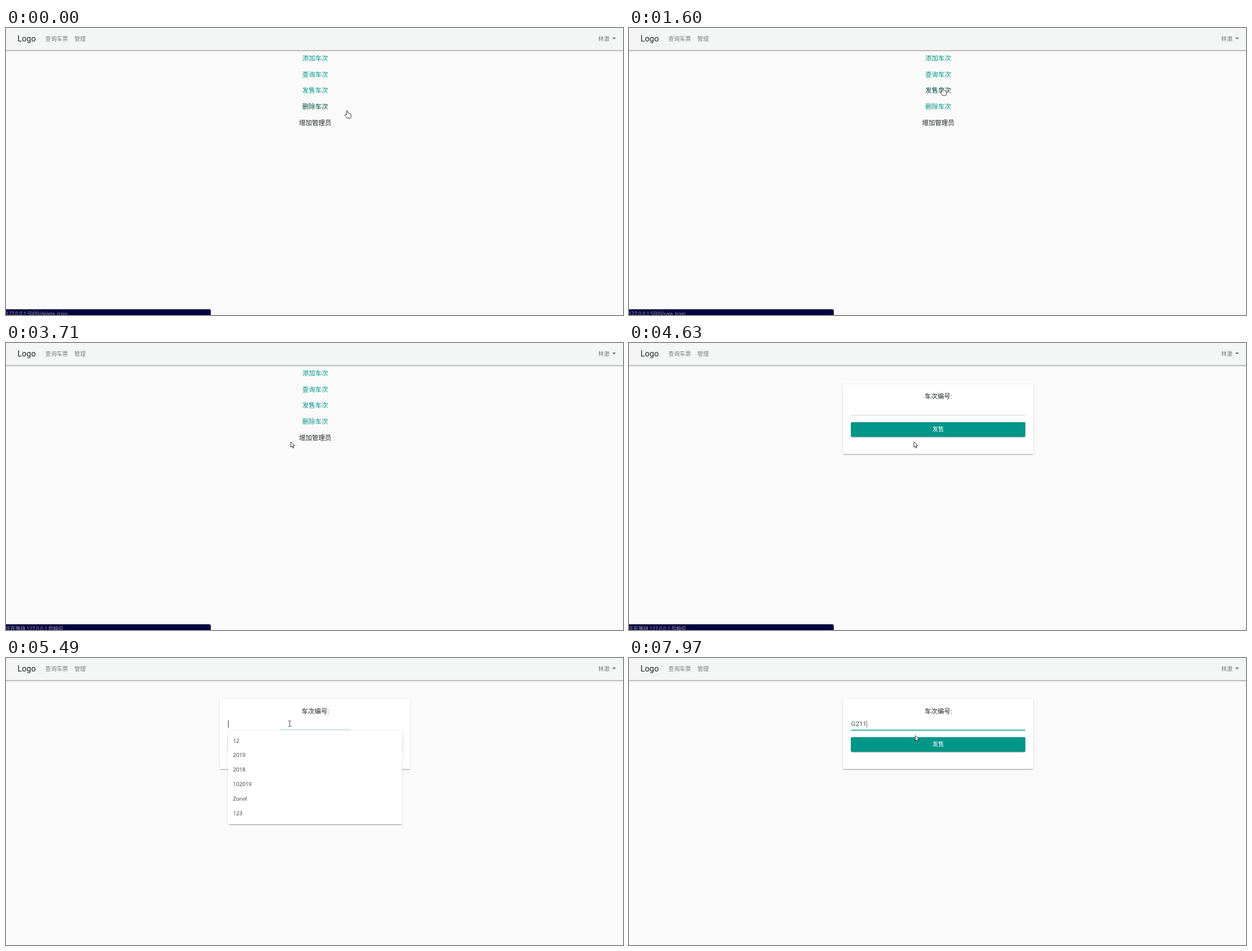
An HTML page with a canvas that plays this animation: 1096x511 px, repeating every 7.99 s.

```html
<!DOCTYPE html>
<html lang="zh">
<head>
<meta charset="utf-8">
<title>车次管理</title>
<style>
html, body { margin: 0; width: 100%; height: 100%; overflow: hidden; background: #fafafa; }
canvas { display: block; }
</style>
</head>
<body>
<canvas id="stage" width="1096" height="511"></canvas>
<script>
const ctx = document.getElementById('stage').getContext('2d');
const LOOP = 7990;
const TEAL = '#009688', INK = '#212529';
const SANS = 'Roboto, "Noto Sans CJK SC", "Noto Sans CJK", sans-serif';
const UI = '"Open Sans", "Noto Sans CJK SC", "Noto Sans CJK", sans-serif';

const LINKS = ['添加车次', '查询车次', '发售车次', '删除车次'];
const HISTORY = ['12', '2019', '2018', '102019', 'Zorvil', '123'];

const shapes = {
  hand: new Path2D('M-1.2 8V1.2Q-1.2 0 0 0T1.2 1.2V4.6Q3.3 4 3.5 5.2Q5.4 4.8 5.6 6Q7 5.8 7 7.4V10Q6.8 11.5 6 13.4H-.6Q-1.5 11.5-4 8.6Q-4.2 7-2.8 7.2Z'),
  arrow: new Path2D('M0 0V9.6L2.2 7.6L3.7 11L5.3 10.3L3.8 7H7Z'),
  beam: new Path2D('M-2.5-5H-.6L0-4.4L.6-5H2.5M0-4.4V4.4M-2.5 5H-.6L0 4.4L.6 5H2.5')
};

// Pointer keys: time, x, y, shape from that time on
const MOVES = [
  [180, 606, 147, 'hand'], [300, 611, 140, 'hand'], [700, 560, 102, 'hand'],
  [980, 560, 102, 'hand'], [1130, 560, 71, 'hand'], [1290, 560, 71, 'hand'],
  [1600, 557, 106.5, 'hand'], [2960, 557, 106.5, 'hand'], [3040, 536, 146, 'arrow'],
  [3120, 516, 186, 'arrow'], [3510, 516, 186, 'arrow'], [3710, 506, 176, 'arrow'],
  [4900, 506, 176, 'arrow'], [4960, 496, 135.5, 'arrow'], [5040, 500, 122, 'beam'],
  [5180, 504, 117, 'beam'], [6180, 504, 117, 'beam'], [6210, 504, 125, 'beam'],
  [7920, 504, 125, 'beam'], [7970, 508.5, 138, 'arrow']
];

// Value of the last [time, value] pair that has begun
const at = (steps, t) => steps.reduce((v, s) => t >= s[0] ? s[1] : v, null);
const between = (t, a, b) => t >= a && t < b;
const clamp = v => Math.max(0, Math.min(1, v));

const HOVER = [[0, 3], [400, 2], [1040, 1], [1440, 2], [3000, -1]];
const STATUS = [
  [0, '127.0.0.1:5000/delete_train'], [400, '127.0.0.1:5000/sale_train'],
  [1040, '127.0.0.1:5000/query_train'], [1440, '127.0.0.1:5000/sale_train'],
  [3080, '正在等待 127.0.0.1 的响应...']
];
const TYPED = [[0, ''], [6180, 'G'], [7180, 'G2'], [7480, 'G21'], [7610, 'G211']];

function text(str, x, y, size, color, font = SANS) {
  ctx.font = size + 'px ' + font;
  ctx.fillStyle = color;
  ctx.fillText(str, x, y);
}

function rect(x, y, w, h, color, radius = 0) {
  ctx.fillStyle = color;
  ctx.beginPath();
  ctx.roundRect(x, y, w, h, radius);
  ctx.fill();
}

// Material elevation: three stacked shadows below one panel
function panel(x, y, w, h, color, radius) {
  const layers = [[1.45, 1.45, 0, 0.14], [2.2, 0.7, 1.4, 0.26], [0.7, 3.6, 0, 0.14]];
  for (const [dy, blur, inset, alpha] of layers) {
    ctx.save();
    ctx.shadowColor = `rgba(0,0,0,${alpha})`;
    ctx.shadowBlur = blur;
    ctx.shadowOffsetY = dy;
    rect(x + inset, y + inset, w - 2 * inset, h - 2 * inset, color, radius);
    ctx.restore();
  }
  rect(x, y, w, h, color, radius);
}

function drawNav() {
  panel(-5, -5, 1106, 44.4, '#f4f6f5', 0);
  rect(0, 39.4, 1096, 1, 'rgba(0,0,0,.2)');
  text('Logo', 20.6, 23.7, 14.4, INK);
  text('查询车票', 69.8, 22.7, 10.1, '#7b7c7c');
  text('管理', 121.5, 22.7, 10.1, '#7b7c7c');
  text('林澈', 1051.8, 22.7, 10.1, '#7b7c7c');
  ctx.fillStyle = '#6c6d6d';
  ctx.fill(new Path2D('M1077 17H1083.4L1080.2 20.2Z'));
}

function drawMenu(t) {
  const active = at(HOVER, t);
  LINKS.forEach((label, i) =>
    text(label, 526.2, 58 + 28.7 * i, 11.5, i === active ? '#004a43' : TEAL));
  text('增加管理员', 520.4, 172.8, 11.5, INK);
}

// Progress of the CSS ease-out curve
function easeOut(p) {
  let lo = 0, hi = 1;
  for (let i = 0; i < 20; i++) {
    const s = (lo + hi) / 2;
    if (1.74 * s * s * (1 - s) + s ** 3 < p) lo = s; else hi = s;
  }
  return 3 * lo * lo - 2 * lo ** 3;
}

function drawForm(t) {
  panel(380, 73.4, 338, 124.2, '#fff', 1.5);
  text('车次编号:', 525, 99.2, 11.5, INK);
  rect(394.5, 128, 309.3, 1, '#d2d2d2');
  panel(394.5, 141, 309.3, 25.8, TEAL, 1.5);
  text('发售', 539, 157.2, 10.3, '#fff');

  const grow = 309.3 * easeOut(clamp((t - 5410) / 300));
  if (grow) rect(549.2 - grow / 2, 127.8, grow, 1.5, TEAL);

  const typed = at(TYPED, t);
  text(typed, 394.6, 121.2, 11.5, '#495057');
  if (between(t, 5380, 5920) || t >= 6180) {
    const x = 394.5 + ctx.measureText(typed).width;
    rect(typed ? x + 0.2 : x, 111, 1, 13, typed ? '#777' : '#222');
  }

  if (between(t, 5450, 7290)) {
    const rows = t < 6210 ? HISTORY : ['G1'];
    panel(394.5, 128.5, 309.5, 12 + 25.9 * rows.length, '#fff', 2.5);
    rows.forEach((row, i) => text(row, 403.2, 150.5 + 25.9 * i, 9.6, '#333', UI));
  }
}

function drawStatus(t) {
  const alpha = t < 4900 ? 1 : clamp((5010 - t) / 130);
  if (!alpha) return;
  ctx.globalAlpha = alpha;
  rect(-4, 500.8, 367.8, 16, '#04043f', 3);
  text(at(STATUS, t), -0.4, 511.6, 8.7, '#a3a3b0', UI);
  ctx.globalAlpha = 1;
}

function pointer(t) {
  const next = MOVES.findIndex(m => m[0] > t);
  if (next === 0) return MOVES[0].slice(1);
  if (next < 0) return MOVES[MOVES.length - 1].slice(1);
  const [t0, x0, y0, kind] = MOVES[next - 1];
  const [t1, x1, y1] = MOVES[next];
  const p = (t - t0) / (t1 - t0);
  return [x0 + (x1 - x0) * p, y0 + (y1 - y0) * p, kind];
}

function drawPointer(t) {
  const [x, y, kind] = pointer(t);
  if (between(t, 2600, 2650) || between(t, 5380, 5430)) {
    ctx.fillStyle = 'rgba(255,255,0,.45)';
    ctx.beginPath();
    ctx.arc(x, y, 8, 0, 7);
    ctx.fill();
  }
  ctx.save();
  ctx.translate(x, y);
  ctx.lineWidth = 0.9;
  ctx.lineJoin = 'round';
  ctx.strokeStyle = '#222';
  if (kind !== 'beam') {
    ctx.fillStyle = '#fff';
    ctx.fill(shapes[kind]);
  }
  ctx.stroke(shapes[kind]);
  ctx.restore();
}

function draw() {
  const t = performance.now() % LOOP;
  rect(0, 0, 1096, 511, '#fafafa');
  drawNav();
  if (t < 4630) drawMenu(t); else drawForm(t);
  drawStatus(t);
  drawPointer(t);
  requestAnimationFrame(draw);
}
draw();
</script>
</body>
</html>
```
